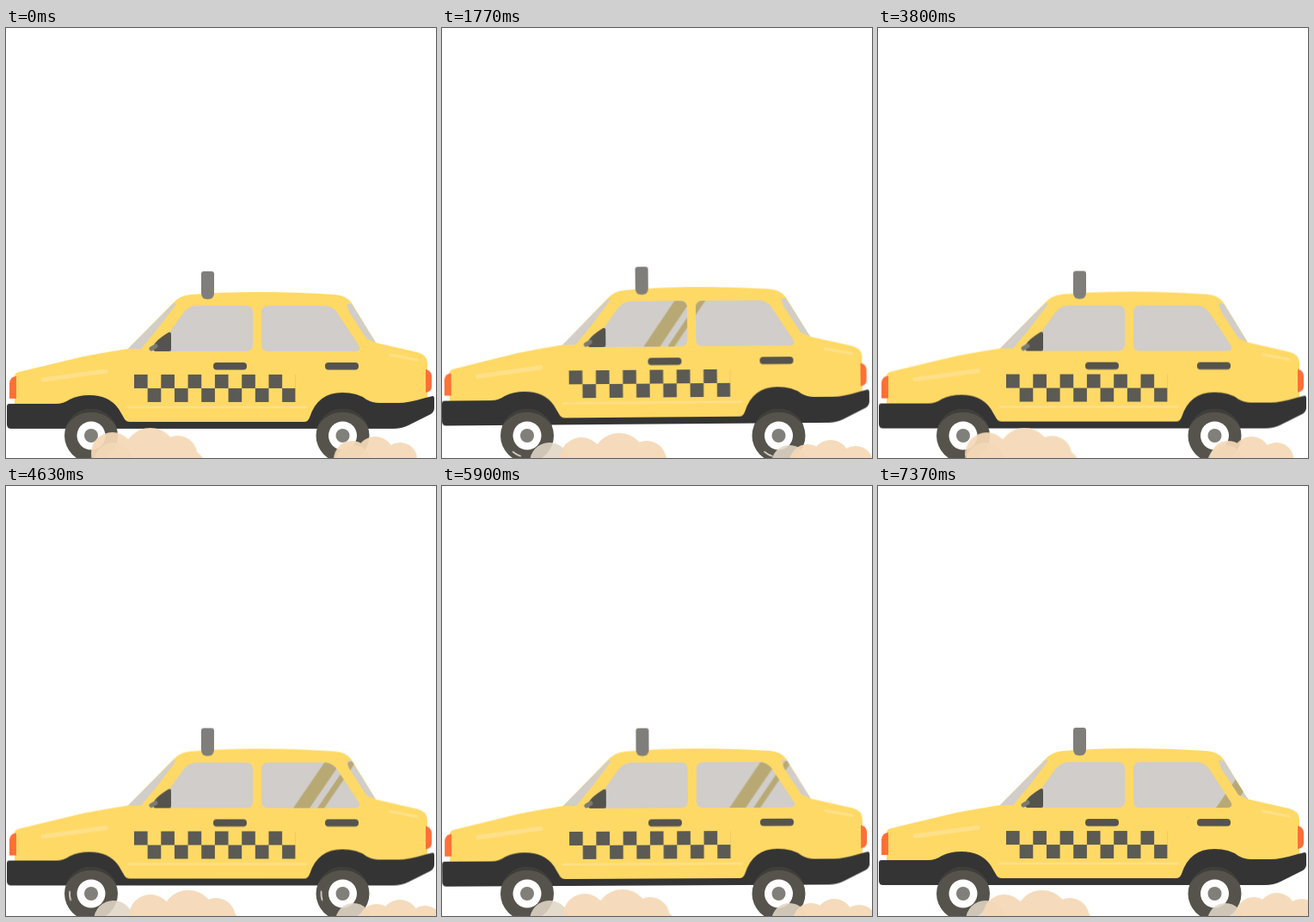
Write an HTML page that moves like this. It is 500 by 500 pixels and loops after 7430 ms.

```html
<!DOCTYPE html>
<html lang="en">
<head>
<meta charset="utf-8">
<title>Taxi</title>
<style>
  :root { --cycle: 1238.333ms; --bob: 619.1667ms; }
  html, body { margin: 0; width: 100%; height: 100%; overflow: hidden; background: #fff; }
  svg { display: block; width: 100%; height: 100%; }

  .body { transform-origin: 250px 400px; animation: bob var(--bob) linear infinite; }
  .shine { animation: shine var(--cycle) linear infinite; }
  .dust-front { animation: dust-front var(--cycle) linear infinite; }
  .dust-rear { animation: dust-rear var(--cycle) linear infinite; }
  .glint {
    fill: none; stroke: #eeeae2; stroke-width: 1.5; stroke-linecap: round;
    animation: spin var(--cycle) linear infinite;
  }

  @keyframes bob {
    0%, 100% { transform: translate(0, 0) rotate(0deg); }
    29.2% { transform: translate(0, -1px) rotate(0deg); }
    47.8% { transform: translate(0, -1.5px) rotate(0deg); }
    52.8% { transform: translate(-1px, -1.5px) rotate(-.3deg); }
    68.3% { transform: translate(0, -1.5px) rotate(0deg); }
    79.1% { transform: translate(-1.5px, -7.5px) rotate(-.5deg); }
    85.9% { transform: translate(-1.5px, -5.6px) rotate(-.5deg); }
    90.4% { transform: translate(0, -2px) rotate(0deg); }
  }
  @keyframes shine {
    0% { transform: translateX(60px); }
    34.2% { transform: translateX(196px); }
    43% { transform: translateX(236px); }
    64.6% { transform: translateX(315px); }
    73.9% { transform: translateX(334px); }
    76.4% { transform: translateX(335px); }
    95.2% { transform: translateX(393px); }
    100% { transform: translateX(425px); }
  }
  @keyframes dust-front {
    0%, 100% { transform: translate(167px, 465px); }
    34.2% { transform: translate(184px, 466px); }
    43% { transform: translate(206px, 471px); }
    64.6% { transform: translate(198px, 470px); }
    73.9% { transform: translate(212px, 470px); }
    76.4% { transform: translate(210px, 469px); }
    95.2% { transform: translate(191px, 470px); }
  }
  @keyframes dust-rear {
    0%, 100% { transform: translate(428px, 475px); }
    34.2% { transform: translate(459px, 475px); }
    43% { transform: translate(452px, 479px); }
    64.6% { transform: translate(455px, 479px); }
    73.9% { transform: translate(458px, 481px); }
    76.4% { transform: translate(456px, 480px); }
    95.2% { transform: translate(464px, 473px); }
  }
  @keyframes spin {
    0%, 30% { transform: rotate(260deg); opacity: 0; }
    34.2% { transform: rotate(190deg); opacity: 1; }
    43% { transform: rotate(120deg); opacity: 1; }
    64.6% { transform: rotate(-235deg); opacity: 1; }
    73.9% { transform: rotate(-185deg); opacity: 1; }
    76.4%, 100% { transform: rotate(-215deg); opacity: 0; }
  }
</style>
</head>
<body>
<svg viewBox="0 0 500 500" preserveAspectRatio="none">
  <defs>
    <path id="glass" d="M142 373L193 322Q196 319 198 321L176 350L157 373Z
      M190 376V354L205 333Q212 323 221 323H279Q287 323 287 331V368Q287 376 279 376Z
      M297 331Q297 323 305 323H370Q379 323 385 331L410 369Q414 376 406 376H305Q297 376 297 368Z
      M396 321H402L430 366L419 361L399 330Z"/>
    <clipPath id="panes"><use href="#glass"/></clipPath>
    <pattern id="checks" x="149" y="403" width="31.3" height="32" patternUnits="userSpaceOnUse">
      <path d="M0 0H15.65V16H0ZM15.65 16H31.3V32H15.65Z" fill="#5b5a54"/>
    </pattern>
    <g id="wheel">
      <circle r="31" fill="#55534b"/>
      <path d="M-29 -11A31 31 0 0 1 29 -11A34 34 0 0 0 -29 -11Z" fill="#403e3a"/>
      <circle r="16.5" fill="#fff"/>
      <circle r="8" fill="#807f79"/>
    </g>
  </defs>

  <g class="body">
    <path d="M10 440V405Q10 401 15 400L90 382Q122 376 142 373L194 320Q202 311 215 310Q290 304 382 310Q396 311 402 320L430 366L478 377Q490 380 490 390V440L350 460H138Z" fill="#ffd966"/>
    <path d="M227 286Q227 283 230 283H239Q242 283 242 286V308Q242 315.500 234.500 315.500T227 308Z" fill="#7f7e7a"/>
    <use href="#glass" fill="#d0cdca"/>
    <g clip-path="url(#panes)">
      <path class="shine" d="M0 376L37 322H56L19 376ZM28 376L65 322H73L36 376Z" fill="#b8a974"/>
    </g>

    <path d="M12 405V431H4V413Q5 405 12 405Z" fill="#ff7038"/>
    <path d="M488 397Q495 399 495 405V417Q495 423 488 424Z" fill="#ff7038"/>
    <g fill="none" stroke="#ffe08a" stroke-linecap="round">
      <path d="M43 409L116 399" stroke-width="5"/>
      <path d="M447 380L478 386" stroke-width="3"/>
      <path d="M142 441H349" stroke-width="2.500"/>
    </g>

    <path d="M189 354Q192 353 192 356V374Q192 376 190 376H174Q171 376 171 372Q171 365 189 354Z" fill="#55534d"/>
    <path d="M169 373L174 370" stroke="#7b7a74" stroke-width="5" stroke-linecap="round"/>
    <rect x="149" y="403" width="187.500" height="32" fill="url(#checks)"/>
    <g fill="#55534d">
      <rect x="241" y="389" width="39" height="8.500" rx="4"/>
      <rect x="371" y="389" width="39" height="8.500" rx="4"/>
    </g>

    <path d="M1 440Q1 437 4 437H58Q67 437 74 432Q84 427 97 427Q120 427 131 443L138 455Q140 458 144 458H347Q351 458 353 453Q362 424 391 424Q409 424 419 432Q426 436 434 436H456Q468 436 488 430L496 428Q498 428 498 431V442Q498 446 494 449L468 462Q460 466 450 466H6Q1 466 1 461Z" fill="#343434"/>
  </g>

  <use href="#wheel" x="99" y="474"/>
  <use href="#wheel" x="391.500" y="474"/>
  <g transform="translate(99 474)"><path class="glint" d="M24.500 -5A25 25 0 0 1 24.500 5"/></g>
  <g transform="translate(391.500 474)"><path class="glint" d="M24.500 -5A25 25 0 0 1 24.500 5"/></g>

  <g fill="#e2d6c6" opacity=".88">
    <circle cx="125" cy="505" r="23"/>
    <circle cx="404" cy="506" r="21"/>
  </g>
  <g fill="#f5d9b6" opacity=".93">
    <g class="dust-front">
      <circle cy="31" r="31"/>
      <circle cx="-44" cy="30" r="25"/>
      <circle cx="32" cy="32" r="23"/>
      <circle cx="42" cy="46" r="22"/>
      <path d="M-50 35H50V60H-50Z"/>
    </g>
    <g class="dust-rear">
      <circle cy="22" r="22"/>
      <circle cx="-27" cy="26" r="21"/>
      <circle cx="29" cy="27" r="20"/>
      <path d="M-30 25H35V50H-30Z"/>
    </g>
  </g>
</svg>
</body>
</html>
```
